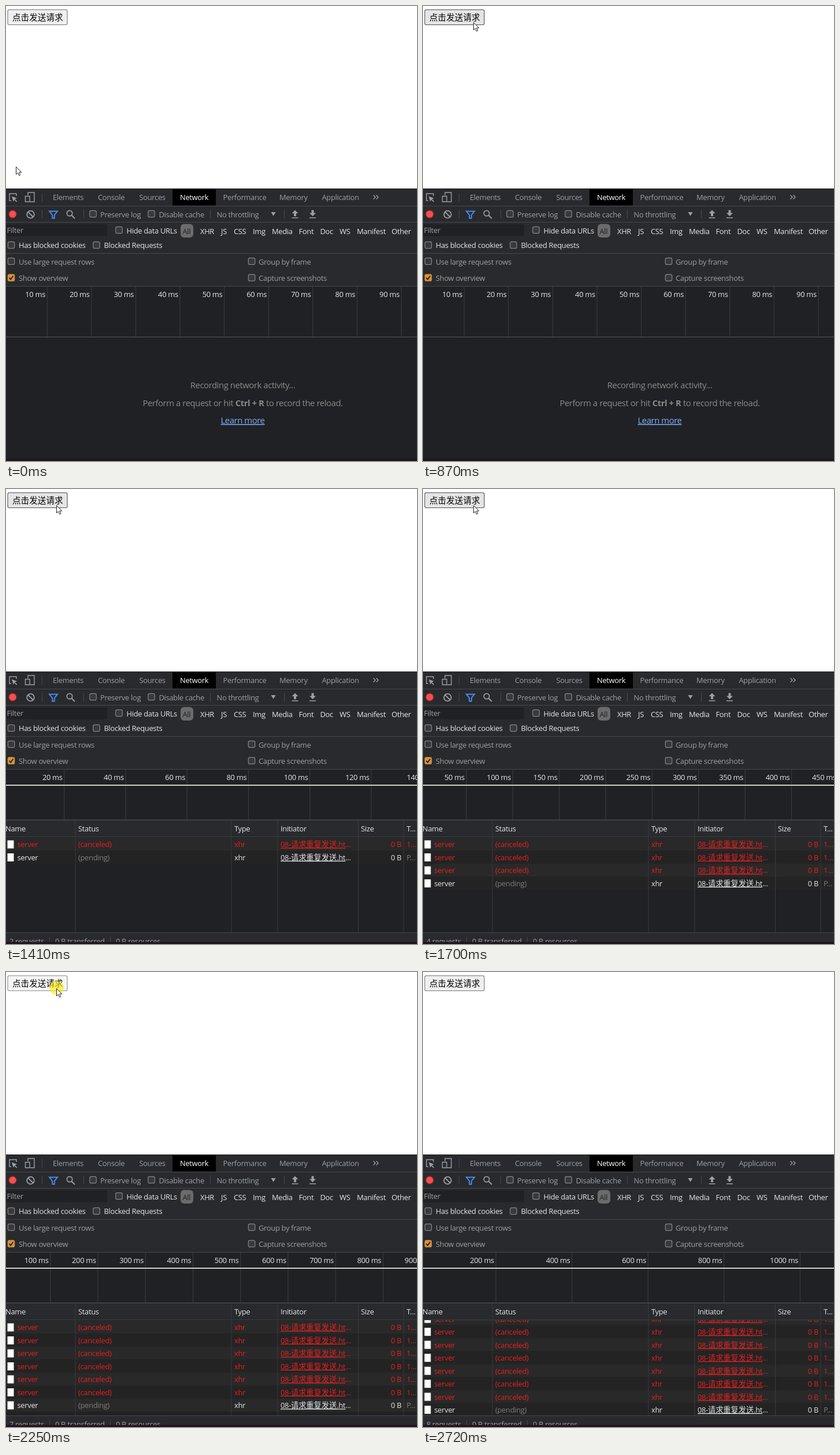
An HTML page that plays this animation: 711x788 px, repeating every 3.41 s.

```html
<!DOCTYPE html>
<html lang="en">
<head>
<meta charset="utf-8">
<title>Repeated requests</title>
<style>
  html, body { margin: 0; width: 100%; height: 100%; overflow: hidden; background: #fff; }
  svg { display: block; width: 711px; height: 788px; }
  text { font: 12.9px "Open Sans", "Noto Sans CJK SC", "Noto Sans CJK", sans-serif; letter-spacing: -.3px; white-space: pre; }
  .cjk { font-size: 13.2px; letter-spacing: 0; }
  .label { font-size: 14.6px; letter-spacing: 0; }
  .note { font-size: 14.8px; letter-spacing: -.4px; }
  .link { text-decoration: underline; }
  .icon { fill: none; stroke: #9aa0a6; stroke-width: 1.4; }
</style>
</head>
<body>
<svg viewBox="0 0 711 788">
  <defs>
    <clipPath id="tableClip"><rect y="603" width="711" height="166"/></clipPath>
  </defs>
  <g id="button"></g>
  <circle id="press" cx="87.5" cy="27.5" r="12.3" fill="#fe0" opacity=".6"/>
  <path id="cursor" d="M.5 .6V13.6L3.5 10.8L5.6 15.6L7.8 14.7L5.7 10H9.8Z" fill="#fff" stroke="#222" stroke-width="1"/>
  <g id="panel"></g>
  <g id="timeline"></g>
  <g id="content"></g>
  <rect y="784.5" width="711" height="4" fill="#20141f"/>
</svg>
<script>
const LOOP = 3410;
const LIGHT = '#e4e6e9', GRAY = '#9aa0a6', DIM = '#7d7d7d', RED = '#e3201f';
const BAR = '#292a2d', BASE = '#202124', LINE = '#46484b';
const $ = id => document.getElementById(id);

const rect = (x, y, w, h, fill, extra = '') =>
  `<rect x="${x}" y="${y}" width="${w}" height="${h}" fill="${fill}" ${extra}/>`;
const text = (x, y, str, fill = GRAY, extra = '') =>
  `<text x="${x}" y="${y}" fill="${fill}" ${extra}>${str}</text>`;
const icon = (d, extra = '') => `<path class="icon" d="${d}" ${extra}/>`;
const divider = (x, y, h) => rect(x, y, 1, h, LINE);

function checkbox(cx, cy, checked) {
  const box = rect(cx - 5.7, cy - 5.7, 11.4, 11.4, checked ? '#d8923a' : '#38393b',
    `rx="2.5" stroke="${checked ? '#d8923a' : '#858688'}" stroke-width="1.2"`);
  return box + (checked ? icon(`M${cx - 3.4} ${cy + .3}l2.5 2.7l4.4 -6`, 'style="stroke:#2a2320;stroke-width:2"') : '');
}

function drawPanel() {
  const tabs = [[81, 'Elements'], [159, 'Console'], [230.5, 'Sources'], [301, 'Network'],
    [375.5, 'Performance'], [473, 'Memory'], [546.5, 'Application']];
  const types = [[336, 'XHR'], [372, 'JS'], [394, 'CSS'], [427, 'Img'], [460, 'Media'], [506.5, 'Font'],
    [543.5, 'Doc'], [577, 'WS'], [607, 'Manifest'], [667, 'Other']];
  const boxes = [
    [150.5, 360, 163, 365.5, 'Preserve log', GRAY], [251.5, 360, 264.5, 365.5, 'Disable cache', GRAY],
    [195.5, 388, 208.5, 393.5, 'Hide data URLs', LIGHT], [9, 414, 22, 419, 'Has blocked cookies', LIGHT],
    [156.5, 414, 169.5, 419, 'Blocked Requests', LIGHT], [9, 442, 22, 448, 'Use large request rows', GRAY],
    [425, 442, 437, 448, 'Group by frame', GRAY], [9, 470.5, 22, 475.5, 'Show overview', GRAY],
    [425, 470.5, 437, 475.5, 'Capture screenshots', GRAY]];

  $('panel').innerHTML =
    rect(0, 316, 711, 472, BASE) + rect(0, 316.5, 711, 169, BAR) +
    [346, 374, 428, 485].map(y => rect(0, y, 711, 1, LINE)).join('') +
    rect(288, 317, 75, 28.5, '#000') +
    tabs.map(([x, s]) => text(x, 336, s, s === 'Network' ? '#fff' : GRAY)).join('') +
    icon('M635.5 327.5l3.5 3.5l-3.5 3.5M640.5 327.5l3.5 3.5l-3.5 3.5') +
    // inspect and device icons
    icon('M9 337H6V325H18V329') +
    `<path d="M10 329.5L19 333L15.4 334.4L19.3 338.3L18 339.4L14.2 335.6L12.7 339Z" fill="${GRAY}"/>` +
    icon('M38 328V323H49V339H42M33.5 329.5H41V339H33.5Z') +
    [[62, 324], [62, 353], [134, 353], [353, 353], [481, 353]].map(([x, y]) => divider(x, y, 15)).join('') +
    // toolbar icons
    '<circle cx="11.5" cy="360.5" r="7.6" fill="#6b2d30"/><circle cx="11.5" cy="360.5" r="6" fill="#ff4d4d"/>' +
    '<circle class="icon" cx="42.5" cy="361" r="6.3" style="stroke-width:1.8"/>' + icon('M38 356.5l9 9', 'style="stroke-width:1.8"') +
    icon('M75 355.5H89L83.8 361.8V367.5H80.2V361.8Z', 'style="stroke:#4a8af4;stroke-width:1.9"') +
    '<circle class="icon" cx="110" cy="359" r="4.7" style="stroke-width:1.7"/>' + icon('M113.5 362.5l5.5 5.5', 'style="stroke-width:1.9"') +
    text(364.5, 365.5, 'No throttling') +
    `<path d="M458.5 357H466.5L462.5 363.5Z" fill="${GRAY}"/>` +
    `<path d="M500 353.5l5.5 5.5h-3.5v5h-4v-5h-3.5ZM494.5 366h11v1.5h-11Z" fill="${GRAY}"/>` +
    `<path d="M530.5 364l5.5-5.5h-3.5v-5h-4v5h-3.5ZM525 366h11v1.5h-11Z" fill="${GRAY}"/>` +
    // filter row
    rect(0, 378, 175, 20.5, BASE) + text(1.5, 393, 'Filter', '#a0a0a0') +
    rect(302, 377.5, 22, 23.5, '#6b6b6b', 'rx="6"') + text(305.5, 395, 'All', '#202020') +
    types.map(([x, s]) => text(x, 395, s, LIGHT)).join('') +
    boxes.map(([cx, cy, x, y, s, c]) => checkbox(cx, cy, s === 'Show overview') + text(x, y, s, c)).join('');
}

// span: milliseconds across the overview; done: length of the activity line
function drawTimeline(span, done) {
  const scale = 717 / span;
  const step = [10, 20, 50, 100, 200].find(s => s * scale >= 70);
  let out = '';
  for (let v = step; v <= span + step; v += step) {
    const x = v * scale - 6;
    out += rect(x.toFixed(2), 486, 1.1, 87, '#393b3e') +
      text((x - 2.6).toFixed(2), 504, v + ' ms', LIGHT, 'text-anchor="end"');
  }
  if (done) out += rect(0, 512, done * scale - 6, 2, '#cfcfc8');
  $('timeline').innerHTML = out + rect(0, 572.5, 711, 1.5, LINE);
}

function row(i, count, scroll) {
  const y = 604 + 22.5 * i - scroll, base = y + 16.3;
  const pending = i === count - 1;
  const main = pending ? LIGHT : RED, side = pending ? DIM : RED;
  return rect(0, y, 711, 22.5, i % 2 ? '#232324' : '#292929') +
    rect(2.5, y + 4.5, 11, 14, '#fff') +
    text(19.5, base, 'server', main) +
    text(125, base, pending ? '(pending)' : '(canceled)', side) +
    text(395, base, 'xhr', main) +
    text(475, base, '<tspan class="link">08-<tspan class="cjk">请求重复发送</tspan>.ht</tspan>...', main) +
    text(684, base, '0 B', main, 'text-anchor="end"') +
    text(693, base, pending ? 'P...' : '1...', side);
}

function drawContent(count) {
  if (!count) {
    const note = (y, s, fill = '#8b8b8b', cls = 'note') => text(409.5, y, s, fill, `class="${cls}" text-anchor="middle"`);
    $('content').innerHTML = note(662, 'Recording network activity...') +
      note(692.5, 'Perform a request or hit <tspan font-weight="700">Ctrl + R</tspan> to record the reload.') +
      note(723, 'Learn more', '#7fb0fb', 'note link');
    return;
  }
  const scroll = Math.max(0, 604 + 22.5 * count - 769.2);
  const rows = Array.from({ length: count }, (_, i) => row(i, count, scroll)).join('');
  const heads = [[-1, 'Name'], [125, 'Status'], [395, 'Type'], [475, 'Initiator'], [614, 'Size'], [693, 'T...']];
  $('content').innerHTML =
    `<g clip-path="url(#tableClip)">${rows}</g>` +
    rect(0, 574, 711, 28, BAR) + rect(0, 602, 711, 1, '#3d3f42') +
    heads.map(([x, s]) => text(x, 593.3, s, LIGHT)).join('') +
    [119.5, 389.5, 469.5, 609, 687.5].map(x => rect(x, 574, 1, 195, '#3a3b3e')).join('') +
    rect(0, 768, 711, 20, BAR) + rect(0, 768, 711, 1, LINE) +
    text(6, 788, count + ' requests') + divider(75, 776, 12) +
    text(85, 788, '0 B transferred') + divider(180, 776, 12) + text(190, 788, '0 B resources');
}

function drawButton(mode) {
  const [fill, stroke] = { rest: ['#efefef', '#767676'], hover: ['#e5e5e5', '#4f4f4f'], down: ['#f5f5f5', '#8d8d8d'] }[mode];
  $('button').innerHTML = rect(3, 6.5, 103, 26, fill, `rx="2.5" stroke="${stroke}" stroke-width="1.1"`) +
    text(11, 25.4, '点击发送请求', '#000', 'class="label"');
}

// [time, x, y]; null hides the pointer
const pointer = [[0, 17, 278], [70, 20, 270], [140, 32, 240], [210, 52, 190], [270, 75, 132], [330, 94, 78],
  [400, 102, 45], [450, 96, 32], [520, 87, 29], [870, 87, 28], [2580, 99, 95], [2650, 102, 191], [2720, null, 0]];
// [press, release, overview span and line at release, then at the next press]
const clicks = [[1140, 1210, 93.6, 0], [1280, 1360, 135, 135], [1440, 1530, 290, 290], [1610, 1700, 446, 446],
  [1770, 1840, 600, 600, 697, 652], [1910, 1980, 720, 720], [2070, 2180, 872, 872], [2250, 2380, 1090, 1090]];

function stateAt(t) {
  const [, x, y] = pointer.filter(p => p[0] <= t).pop();
  const done = clicks.filter(c => c[1] <= t);
  const down = clicks.some(c => c[0] <= t && t < c[1]);
  const over = x !== null && x < 106 && y < 33;
  const last = done[done.length - 1] || [0, 0, 93.6, 0];
  const later = down && last.length > 4;
  return {
    x, y, down, count: done.length,
    mode: down ? 'down' : over ? 'hover' : 'rest',
    span: later ? last[4] : last[2], line: later ? last[5] : last[3]
  };
}

let shown = '';
function render(now) {
  const s = stateAt(now % LOOP), key = JSON.stringify(s);
  if (key !== shown) {
    shown = key;
    drawButton(s.mode);
    drawTimeline(s.span, s.line);
    drawContent(s.count);
    $('press').style.display = s.down ? '' : 'none';
    $('cursor').style.display = s.x === null ? 'none' : '';
    $('cursor').setAttribute('transform', `translate(${s.x || 0} ${s.y})`);
  }
}

drawPanel();
const start = performance.now();
function tick() {
  render(performance.now() - start);
  requestAnimationFrame(tick);
}
tick();
</script>
</body>
</html>
```
